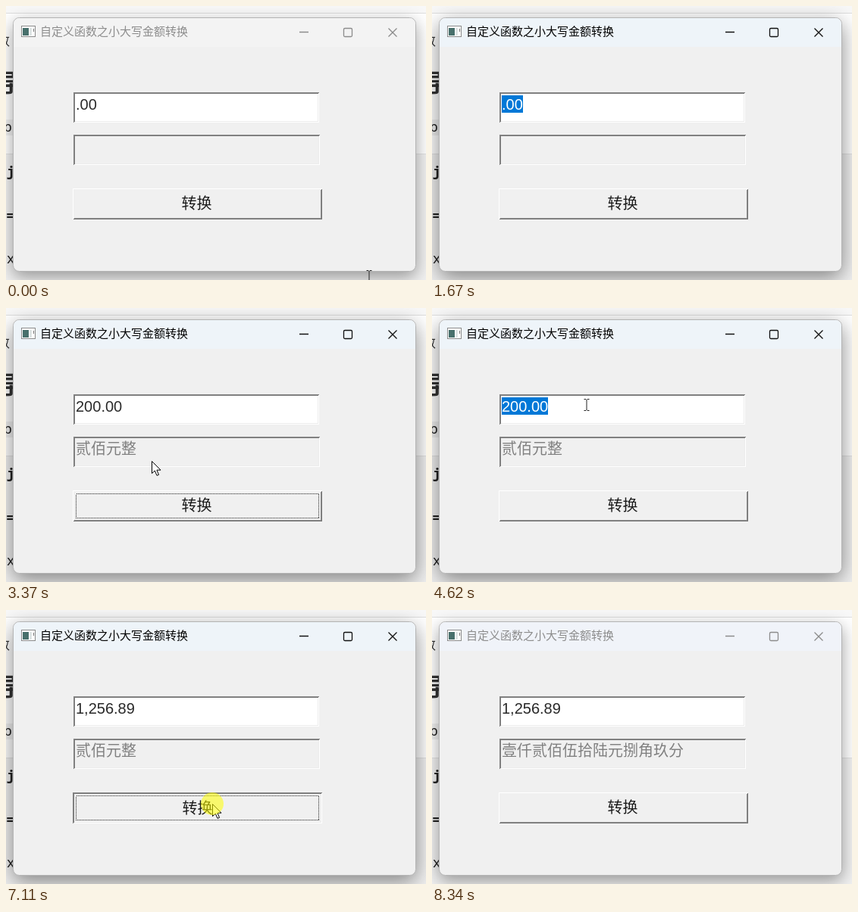
Recreate the animation shown at these times as an HTML page. Size 554 by 362 pixels, loop 8.39 s.

```html
<!DOCTYPE html>
<html lang="zh-CN">
<head>
<meta charset="utf-8">
<style>
  html, body { margin: 0; width: 100%; height: 100%; overflow: hidden; background: #fff; }
  svg { display: block; width: 554px; height: 362px; }
  text { font-family: 'Noto Sans CJK SC', 'Noto Sans CJK', sans-serif; white-space: pre; }
  .mono { font: 18px 'Noto Sans Mono', 'DejaVu Sans Mono', monospace; }
  .bold { font-weight: 700; }
  .big { font-size: 20px; font-weight: 350; }
  #amount { font: 20px 'Liberation Sans', Arial, sans-serif; font-kerning: none; }
  .crisp { shape-rendering: crispEdges; }
</style>
</head>
<body>
<svg viewBox="0 0 554 362">
  <!-- page behind the window -->
  <rect width="554" height="362" fill="#fff"/>
  <g class="crisp">
    <rect width="554" height="10" fill="#f8f8f8"/>
    <rect y="9" width="554" height="1" fill="#dedede"/>
    <rect y="150" width="12" height="21" fill="#f0f0f0"/>
    <rect y="195" width="554" height="167" fill="#f1f1f1"/>
    <rect y="195" width="554" height="1" fill="#e2e2e2"/>
  </g>
  <g fill="#333">
    <text x="5" y="52" font-size="17" text-anchor="end">函数</text>
    <text class="bold" x="-15" y="113" font-size="32">导</text>
    <g fill="#222">
      <text class="mono" x="-3" y="166">b</text>
      <text class="mono bold" x="-10" y="225">tj</text>
      <text class="mono bold" x="0" y="283">=</text>
      <text class="mono" x="-10" y="340">ax</text>
    </g>
  </g>

  <!-- window -->
  <rect id="frame" x="9.5" y="15.5" width="531" height="335" rx="8" fill="#f0f0f0" stroke="#b4b4b4"/>
  <path id="bar" d="M10 54V24a8 8 0 0 1 8-8H532a8 8 0 0 1 8 8V54Z"/>
  <g class="crisp">
    <rect x="20.5" y="26.5" width="18" height="14" fill="#fff" stroke="#8a8a8a"/>
    <rect x="22" y="29" width="8" height="10" fill="#48706c"/>
    <rect x="31" y="29" width="3" height="10" fill="#dfe5e5"/>
    <rect x="36" y="30" width="1" height="4" fill="#777"/>
  </g>
  <text id="title" x="45" y="39" font-size="15">自定义函数之小大写金额转换</text>
  <g id="controls" fill="none" stroke-width="1.3">
    <path d="M387 34.5H399M504.5 29.5l11 11m0-11l-11 11"/>
    <rect x="445.5" y="29.5" width="11" height="11" rx="1.5"/>
  </g>

  <g id="fields" class="crisp"></g>
  <g id="up" class="crisp"></g>
  <g id="down" class="crisp"></g>
  <rect id="focus" class="crisp" x="92.5" y="245.5" width="320" height="32" fill="none" stroke="#222" stroke-dasharray="1 1"/>
  <text id="label" class="big" fill="#1c1c1c">转换</text>
  <rect id="select" class="crisp" y="118" height="23" fill="#0078d7"/>
  <text id="amount" x="92" y="136.6" fill="#2a2a2a"><tspan></tspan><tspan fill="#fff"></tspan><tspan></tspan></text>
  <rect id="caret" class="crisp" y="118" width="1" height="22" fill="#000"/>
  <text id="result" class="big" x="92" y="192.6" fill="#808080"></text>

  <!-- pointer -->
  <path id="beam" d="M-3.5 -7.5h2.5l1 1 1-1h2.5M0 -6.5V6.5M-3.5 7.5h2.5l1-1 1 1h2.5" fill="none" stroke="#222"/>
  <path id="arrow" d="M.5 .5V16.5L4.3 13 7 19.3 9.5 18.3 6.9 12.1H12Z" fill="#fff" stroke="#000"/>
  <circle id="spot" r="15" fill="#ff0" opacity=".55"/>
</svg>
<script>
const LOOP = 8390, STEP = 66.8;
const $ = id => document.getElementById(id);
const show = (id, on) => $(id).style.display = on ? '' : 'none';
const within = (t, spans) => spans.some(([a, b]) => t >= a && t < b);

// Classic two-pixel bevel: outer and inner ring, light and shade
function bevel(x, y, w, h, fill, rings) {
  return `<rect x="${x}" y="${y}" width="${w}" height="${h}" fill="${fill}"/>` +
    rings.map(([topLeft, bottomRight], i) => {
      const l = x + i + .5, t = y + i + .5, r = x + w - i - .5, b = y + h - i - .5;
      return `<path d="M${l} ${b}V${t}H${r}" fill="none" stroke="${topLeft}"/>` +
        `<path d="M${l} ${b}H${r}V${t}" fill="none" stroke="${bottomRight}"/>`;
    }).join('');
}
const sunken = [['#868686', '#fff'], ['#7a7a7a', '#ececec']];
const raised = [['#fff', '#747474'], ['#f0f0f0', '#8c8c8c']];
$('fields').innerHTML = bevel(89, 114, 324, 40, '#fff', sunken) + bevel(89, 170, 325, 40, '#f0f0f0', sunken);
$('up').innerHTML = bevel(88, 241, 329, 41, '#f0f0f0', raised);
$('down').innerHTML = bevel(88, 241, 329, 41, '#f0f0f0', sunken);

// time, text, selection start, selection end, caret shown at the end
const edits = [
  [0, '.00', 0, 0, 0],
  [870, '.00', 3, 3, 1],
  [1340, '.00', 3, 3, 0],
  [1670, '.00', 0, 3, 0],
  [1740, '2.00', 1, 1, 1],
  [1880, '20.00', 2, 2, 1],
  [2010, '200.00', 3, 3, 1],
  [2540, '200.00', 3, 3, 0],
  [3720, '200.00', 6, 6, 1],
  [4090, '200.00', 0, 6, 1],
  [4620, '200.00', 0, 6, 0],
  [4820, '1.00', 1, 1, 1],
  [5030, '12.00', 2, 2, 1],
  [5230, '125.00', 3, 3, 1],
  [5450, '1,256.00', 5, 5, 1],
  [5720, '1,256.00', 6, 7, 0],
  [5850, '1,256.80', 7, 8, 0],
  [5910, '1,256.89', 8, 8, 1],
  [6440, '1,256.89', 8, 8, 0]
];

// time, x, y of the pointer
const path = [
  [0, 479, 357], [330, 350, 262], [600, 220, 158], [800, 179, 124],
  [1130, 179, 124], [1330, 186, 125], [2440, 186, 125],
  [2600, 190, 190], [2800, 205, 268], [3010, 205, 272], [3140, 202, 264],
  [3340, 192, 202], [3540, 200, 145], [3670, 204, 128],
  [6300, 204, 128], [6550, 228, 180], [6800, 262, 245], [6950, 272, 256],
  [7180, 272, 256], [7300, 370, 280], [7480, 501, 314], [7530, 620, 345]
];
const hidden = [[1670, 2470], [4820, 6310], [7530, LOOP]];
const clicks = [[800, 940], [2860, 3000], [3720, 3860], [7040, 7180]];
const pressed = [[2860, 3000], [7040, 7180]];
const focused = [[2860, 3720], [7040, 8260]];

function pointerAt(t) {
  const i = path.findIndex(p => p[0] > t);
  if (i < 0) return path.at(-1).slice(1);
  const [t0, x0, y0] = path[i - 1], [t1, x1, y1] = path[i], k = (t - t0) / (t1 - t0);
  return [Math.round(x0 + (x1 - x0) * k), Math.round(y0 + (y1 - y0) * k)];
}

const edge = (text, n) =>
  92 + [...text.slice(0, n)].reduce((w, c) => w + (/\d/.test(c) ? 11.12 : 5.56), 0);

function drawWindow(t) {
  const active = t >= 800 && t < 8260;
  $('frame').style.filter = `drop-shadow(0 ${active ? 8 : 7}px ${active ? 14 : 11}px rgba(0,0,0,${active ? .46 : .38}))`;
  $('bar').setAttribute('fill', active ? '#eef4f9' : t < 800 ? '#f3f3f3' : '#f0f3f9');
  $('title').setAttribute('fill', active ? '#000' : '#8c8c8c');
  $('controls').setAttribute('stroke', active ? '#111' : '#8c8c8c');
}

function drawForm(t) {
  const [, text, a, b, caret] = edits.findLast(e => e[0] <= t);
  const left = edge(text, a), right = edge(text, b);
  const parts = $('amount').children;
  [text.slice(0, a), text.slice(a, b), text.slice(b)].forEach((s, i) => parts[i].textContent = s);
  $('select').setAttribute('x', left);
  $('select').setAttribute('width', right - left);
  $('caret').setAttribute('x', Math.round(right));
  show('caret', caret);

  $('result').textContent = t < 3000 ? '' : t < 7180 ? '贰佰元整' : '壹仟贰佰伍拾陆元捌角玖分';
  const down = within(t, pressed);
  show('up', !down);
  show('down', down);
  show('focus', within(t, focused));
  $('label').setAttribute('x', down ? 232.5 : 231.5);
  $('label').setAttribute('y', down ? 268.6 : 267.6);
}

function drawPointer(t) {
  const [x, y] = pointerAt(Math.floor(t / STEP) * STEP);
  const inInput = x > 89 && x < 413 && y > 114 && y < 153;
  const outside = x > 540 || y > 350;
  const visible = !within(t, hidden), beam = inInput || outside;
  for (const id of ['spot', 'beam', 'arrow']) $(id).setAttribute('transform', `translate(${x} ${y})`);
  show('beam', visible && beam);
  show('arrow', visible && !beam);
  show('spot', within(t, clicks));
}

const start = performance.now();
function frame() {
  const t = (performance.now() - start) % LOOP;
  drawWindow(t);
  drawForm(t);
  drawPointer(t);
  requestAnimationFrame(frame);
}
frame();
</script>
</body>
</html>
```
